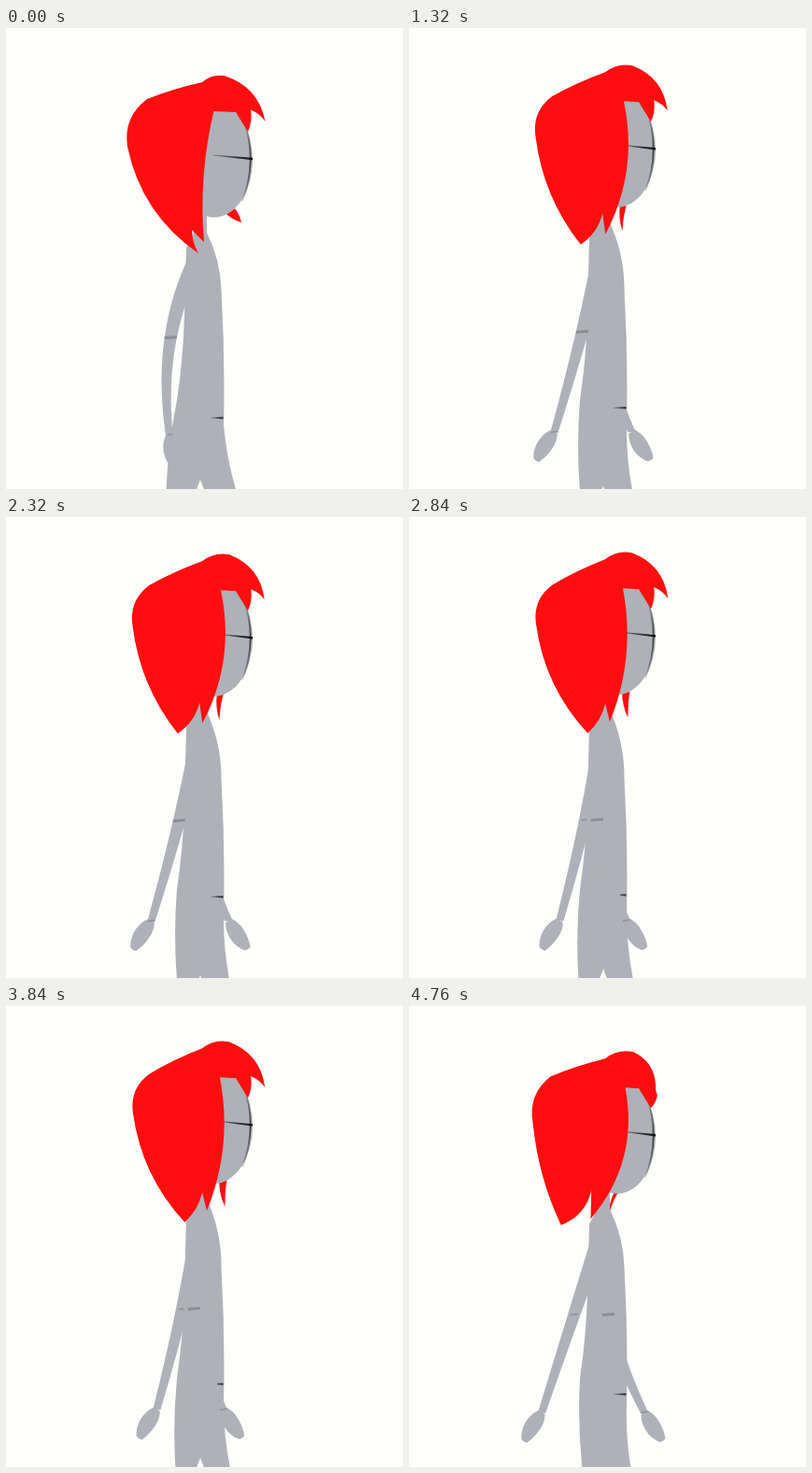
An HTML page for the animation above (4800 ms loop, 425 px wide and 493 px high).

```html
<!DOCTYPE html>
<html lang="en">
<head>
<meta charset="utf-8">
<title>Walk cycle</title>
<style>
html, body { margin: 0; width: 100%; height: 100%; overflow: hidden; background: #fefefb; }
svg { display: block; width: 100vw; height: 100vh; }
</style>
</head>
<body>
<svg viewBox="0 0 425 493">
  <defs>
    <linearGradient id="fade">
      <stop offset="0" stop-color="#222" stop-opacity=".3"/>
      <stop offset=".6" stop-color="#161616" stop-opacity=".85"/>
      <stop offset="1" stop-color="#111"/>
    </linearGradient>
    <linearGradient id="rim" x2="0" y2="1">
      <stop offset="0" stop-color="#333" stop-opacity=".1"/>
      <stop offset=".5" stop-color="#222" stop-opacity=".85"/>
      <stop offset="1" stop-color="#333" stop-opacity=".2"/>
    </linearGradient>
    <filter id="soft" x="-30%" y="-150%" width="160%" height="400%"><feGaussianBlur stdDeviation=".6"/></filter>
  </defs>
  <rect width="425" height="493" fill="#fefefb"/>
  <g fill="#aeb1b8">
    <g class="skull"><path id="lock" fill="#fe0e0f"/></g>
    <path id="farArm"/>
    <path id="farMark" stroke="#94969c" stroke-width="2" filter="url(#soft)"/>
    <path id="torso"/>
    <path id="waist" fill="url(#fade)" opacity=".75" filter="url(#soft)"/>
    <g class="skull">
      <ellipse rx="41" ry="61.5"/>
      <path d="M31,-44Q47,0 30,44" fill="none" stroke="url(#rim)" stroke-width="1.8"/>
      <path id="brow" fill="url(#fade)" filter="url(#soft)"/>
    </g>
    <path id="nearArm"/>
    <path id="nearMark" stroke="#8b8d93" stroke-width="3" filter="url(#soft)"/>
    <path id="wrist" stroke="#94969c" stroke-width="2" filter="url(#soft)"/>
    <g class="skull"><path id="hair" fill="#fe0e0f"/></g>
  </g>
</svg>
<script>
const FRAME = 40, LOOP = 4800, CYCLE = 25, TAU = 2 * Math.PI;
const HEAD_X = 223, FLOOR = 495;

const draw = (id, d) => document.getElementById(id).setAttribute("d", d);
const pt = (x, y) => x.toFixed(2) + "," + y.toFixed(2) + " ";

// Closed shape through [x, y, bend]; bend bows the side that arrives at the point
function outline(pts) {
  let [px, py] = pts[0], d = "M" + pt(px, py);
  for (const [x, y, bend = 0] of [...pts.slice(1), pts[0]]) {
    d += "Q" + pt((px + x) / 2 + (y - py) * bend, (py + y) / 2 - (x - px) * bend) + pt(x, y);
    [px, py] = [x, y];
  }
  return d + "Z";
}

const wedge = (x1, y1, x2, y2, w) => outline([[x1, y1 - .5], [x2, y2 - w], [x2, y2 + w], [x1, y1 + .5]]);
const dash = (x, y, r) => "M" + pt(x - r, y + .5) + "L" + pt(x + r, y - .5);

// Joints of an arm swinging like a pendulum, each lagging the one above
function armPose(phase, drop) {
  const swing = (mid, size, back) => mid - size * Math.cos((phase - back) / CYCLE * TAU);
  const elbow = [swing(195, 27, 3.2), 331 + 8 * drop];
  const wrist = [swing(197, 60.5, 4.75), 435 + 4 * drop];
  const reach = swing(0, 20, 7.5);
  return { elbow, wrist, tip: [wrist[0] + reach, wrist[1] + Math.sqrt(36 ** 2 - reach ** 2)] };
}

function armPath(shoulder, { elbow, wrist, tip }) {
  const len = Math.hypot(wrist[0] - shoulder[0], wrist[1] - shoulder[1]);
  const normal = [(wrist[1] - shoulder[1]) / len, (shoulder[0] - wrist[0]) / len];
  const off = (p, r) => p.map((v, i) => v + normal[i] * r);
  const side = k => {
    const top = off(shoulder, 9 * k), mid = off(elbow, 6.5 * k), end = off(wrist, 4 * k);
    return { top, end, ctrl: mid.map((v, i) => 2 * v - (top[i] + end[i]) / 2) };
  };
  const a = side(-1), b = side(1);
  const limb = "M" + pt(...a.top) + "Q" + pt(...a.ctrl) + pt(...a.end) +
    "L" + pt(...b.end) + "Q" + pt(...b.ctrl) + pt(...b.top) + "Z";

  const dx = tip[0] - wrist[0], dy = tip[1] - wrist[1], size = Math.hypot(dx, dy);
  const local = (u, v, bend) => [wrist[0] + dx * u + dy / size * v, wrist[1] + dy * u - dx / size * v, bend];
  return limb + outline([local(0, 4, -.15), local(0, -4), local(.5, -9, -.15), local(1, -3, -.15), local(1, 4, -.2), local(.45, 8, -.1)]);
}

function render(ms) {
  const phase = Math.floor(ms % LOOP / FRAME) % CYCLE;
  const step = 2 * phase / CYCLE * TAU;   // two steps per cycle
  const turn = -Math.cos(step);           // head and hips turning
  const drop = Math.sin(step);            // body sinking
  const flick = Math.cos(3 * step);       // fringe fluttering
  const hy = 141 + 14 * drop;

  for (const g of document.querySelectorAll(".skull"))
    g.setAttribute("transform", `translate(${HEAD_X} ${hy.toFixed(2)})`);

  draw("hair", outline([
    [-72 - 3 * drop, -65 - 10 * drop, .3],
    [-13, -83, .04],
    [14 + 3.5 * turn, -90, .23],
    [47.5 + 7 * flick, -48 + 7 * flick, .3],
    [41 - 2 * flick, -48.5 - 5 * flick, -.15],
    [36, -30, .15],
    [23, -51],
    [4 + 4.6 * turn, -52],
    [-21 - 10 * turn - 19 * drop, 88 - 3 * drop, .08 + .16 * turn],
    [-27 - 3 * turn - 17 * drop, 66 - 9 * turn - 10 * drop],
    [-40 - 23 * turn - 20 * drop, 97 - 3 * turn - 8 * drop, .07 + .2 * turn],
    [-92 + turn - 5 * drop, -14, .14 - .06 * turn - .05 * drop]
  ]));

  const root = 5 - 8 * turn - 4 * drop;
  draw("lock", outline([
    [root, 58, .12],
    [root + 9, 52],
    [9 - 20 * turn - 12 * drop, 76 + 9 * turn - 7 * drop, -.12 * turn]
  ]));
  draw("brow", wedge(3 + 4 * turn, -5, 41, -1, 1.2));

  const fork = Math.min(FLOOR, 499 + 16 * turn + 25 * drop), gap = (FLOOR - fork) * .38;
  draw("torso", outline([
    [207, hy + 55],
    [193, hy + 94, .1],
    [191, 308],
    [183, 398, .03],
    [178.5 + 7 * turn, FLOOR, -.04],
    [208 - gap, FLOOR],
    [208, fork],
    [208 + gap, FLOOR],
    [242 - 4.5 * turn, FLOOR],
    [233, 425, .05],
    [230.5, 280, -.02],
    [215, hy + 78, -.11],
    [215, hy + 55]
  ]));
  draw("waist", wedge(219, hy + 276, 232.5, hy + 276, 1.2));

  const shoulder = [208, hy + 98];
  const near = armPose(phase, drop), far = armPose(phase + CYCLE / 2, drop);
  draw("nearArm", armPath(shoulder, near));
  draw("farArm", armPath(shoulder, far));
  draw("nearMark", dash(...near.elbow, 6.5));
  draw("farMark", dash(...far.elbow, 4));
  draw("wrist", dash(...near.wrist, 3.5));
}

function tick() {
  render(performance.now());
  requestAnimationFrame(tick);
}
tick();
</script>
</body>
</html>
```
